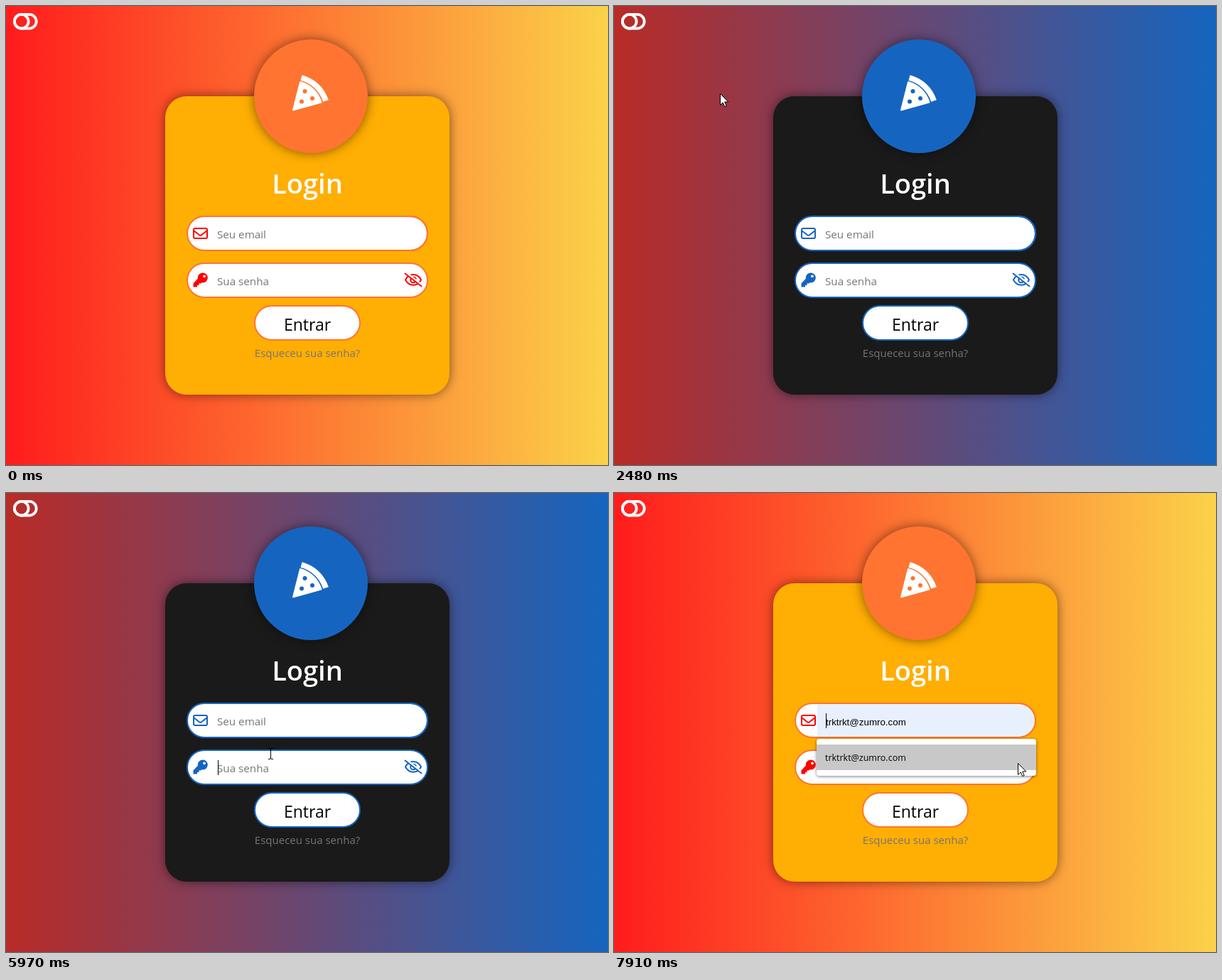
Animation, 847 px wide and 646 px high, one loop 7.99 s. Source, as an HTML page:

```html
<!DOCTYPE html>
<html lang="pt-BR">
<head>
<meta charset="utf-8">
<title>Login</title>
<style>
  html, body { margin: 0; width: 100%; height: 100%; overflow: hidden; }
  body {
    --accent: #ff7430; --icon: #f00; --card: #ffae03;
    background: linear-gradient(90deg, #ff1c1c, #fbd249);
  }
  body.dark {
    --accent: #1565c0; --icon: #1565c0; --card: #1a1a1a;
    background: linear-gradient(90deg, #b92b27, #1565c0);
  }
  .card, .badge, svg { position: absolute; }
  .card, .badge { box-shadow: 0 0 15px rgba(0, 0, 0, .5); }
  .card { left: 224px; top: 127px; width: 400px; height: 420px; border-radius: 30px; background: var(--card); }
  .badge { left: 349px; top: 47px; width: 160px; height: 160px; border-radius: 50%; background: var(--accent); }
  svg { left: 0; top: 0; }
  text { font-family: "Open Sans", "Noto Sans", sans-serif; }
  .mid { text-anchor: middle; }
  .hint { font-size: 15.2px; fill: #757575; }
  .box { fill: #fff; stroke: var(--accent); stroke-width: 2; }
  .edge { fill: none; stroke-width: 2; }
  .line { fill: none; stroke: var(--icon); stroke-width: 2; stroke-linejoin: round; stroke-linecap: round; }
  .toggle { fill: none; stroke: #fff; stroke-width: 3.8; }
  .caret { stroke: #000; }
  .pointer { fill: #fff; stroke: #000; stroke-linejoin: round; }
</style>
</head>
<body>
<div class="card"></div>
<div class="badge"></div>
<svg width="847" height="646" viewBox="0 0 847 646">
  <g class="toggle">
    <rect x="11.9" y="11.9" width="30.8" height="19.7" rx="9.85"/>
    <circle cx="21.75" cy="21.75" r="9.85"/>
  </g>

  <g fill="#fff">
    <path d="M404 146.5 414 107A42 42 0 0 1 443.5 135.5Z" stroke="#fff" stroke-width="2" stroke-linejoin="round"/>
    <path d="M415.5 101A49 49 0 0 1 450 133.5" fill="none" stroke="#fff" stroke-width="8"/>
    <g fill="var(--accent)">
      <circle cx="420.5" cy="120" r="3"/><circle cx="431" cy="130" r="3"/><circle cx="416" cy="134.5" r="3"/>
    </g>
  </g>

  <text class="mid" x="424" y="263.5" font-size="38" font-weight="600" fill="#fff">Login</text>

  <rect class="box" x="255" y="296" width="338" height="48" rx="24"/>
  <path id="filled" d="M286 297H570a23 23 0 0 1 0 46H286Z" fill="#e8f0fe"/>
  <path class="edge" d="M286 296H569a24 24 0 0 1 0 48H286"/>
  <g class="line">
    <rect x="264" y="313" width="19" height="14" rx="2"/>
    <path d="M264.5 316.5 272 322.3q1.5 1 3 0L282.5 316.5"/>
  </g>
  <text class="hint" id="emailHint" x="297" y="327">Seu email</text>
  <text id="emailText" x="298" y="327" style="font:13.33px 'Liberation Sans',Arial,sans-serif">trktrkt@zumro.com</text>
  <path class="caret" id="emailCaret" d="M298.5 310V331"/>

  <rect class="box" x="255" y="362" width="338" height="48" rx="24"/>
  <path class="edge" d="M286 362H562M286 410H562"/>
  <g fill="var(--icon)">
    <circle cx="276.8" cy="382.5" r="7"/>
    <path d="M270.5 383 263.5 390.5V395.5H269V393H271.5V390.5H274L278 387Z"/>
    <circle cx="279" cy="380.4" r="1.8" fill="#fff"/>
  </g>
  <g class="line" stroke-width="1.8">
    <path d="M562 385.5C567 375.5 579 375.5 584 385.5 579 395 567 395 562 385.5Z"/>
    <circle cx="573" cy="385.5" r="3.8"/>
    <path d="M562.5 375 586.5 394" style="stroke:#fff;stroke-width:3"/>
    <path d="M561.5 376.5 584.5 394.5"/>
  </g>
  <text class="hint" x="297" y="393">Sua senha</text>
  <path class="caret" id="passCaret" d="M298.5 376V397"/>

  <rect class="box" x="350" y="422" width="148" height="48" rx="24"/>
  <text class="mid" x="424" y="457" font-size="23">Entrar</text>
  <text class="mid hint" x="424" y="494" style="font-size:15px">Esqueceu sua senha?</text>

  <g id="menu">
    <rect x="285" y="346" width="309" height="52" rx="4" fill="#fff" style="filter:drop-shadow(0 1px 2px rgba(0,0,0,.5))"/>
    <rect id="row" x="285" y="354" width="309" height="36" fill="#c8c8c8"/>
    <text x="297" y="377" font-size="12.5">trktrkt@zumro.com</text>
  </g>

  <g id="cursor">
    <path class="pointer" id="arrow" d="M.5.5V16.5L4.2 13 6.8 18.6 9.2 17.5 6.7 12H11.8Z"/>
    <path class="pointer" id="hand" d="M-1.5 13V2a1.6 1.6 0 0 1 3.2 0V8a1.4 1.4 0 0 1 2.8.5 1.4 1.4 0 0 1 2.8.7 1.3 1.3 0 0 1 2.7.8V16L8 19.5V22.5H-.5V20.5L-5.5 14C-6.7 11.5-4-10.5-1.5 13Z"/>
    <path id="beam" d="M-3 -7.5H-1Q.5-7.5.5-6 .5-7.5 2-7.5H4M.5-6V6M-3 7.5H-1Q.5 7.5.5 6 .5 7.5 2 7.5H4" fill="none" stroke="#000"/>
  </g>
</svg>
<script>
const LOOP = 7990, TICK = 77.4, BLINK = 500, FADE = 150;
const DARK = [1220, 6661];
const EMAIL_FOCUS = [[4430, 5270], [7440, LOOP]];
const PASS_FOCUS = [[5880, 6661]];
const ORANGE = [255, 116, 48], BLUE = [21, 101, 192];

// time, x, y of the pointer tip
const PATH = [
  [60, 676, 527], [450, 330, 250], [840, 41, 40], [1000, 36, 28], [1220, 39, 36],
  [2250, 39, 36], [2560, 260, 210], [3024, 523, 450], [3100, 485, 460],
  [3333, 342, 346], [3800, 99, 138], [3980, 24, 63], [4430, 330, 322],
  [4720, 331, 344], [4882, 328, 364], [5270, 420, 275], [5580, 391, 313],
  [5660, 391, 325], [5733, 391, 378], [5888, 384, 377], [5965, 372, 367],
  [6660, 30, 18], [6900, 90, 70], [7440, 480, 315], [7590, 510, 278],
  [7670, 520, 300], [7750, 535, 335], [7825, 555, 365], [7900, 568, 380]
];

const byId = id => document.getElementById(id);
const show = (id, on) => byId(id).style.display = on ? "" : "none";
const within = (v, a, b) => v >= a && v < b;
const focusAge = (spans, t) => {
  const span = spans.find(([a, b]) => within(t, a, b));
  return span ? t - span[0] : -1;
};
const caretOn = age => age >= 0 && Math.floor(age / BLINK) % 2 === 0;

function pointerAt(t) {
  const i = PATH.findIndex(k => k[0] > t);
  if (i < 0) return PATH[PATH.length - 1].slice(1);
  if (i === 0) return PATH[0].slice(1);
  const [a, b] = [PATH[i - 1], PATH[i]];
  const p = (t - a[0]) / (b[0] - a[0]);
  return [1, 2].map(n => Math.round(a[n] + (b[n] - a[n]) * p));
}

function pointerKind(x, y, menuOpen) {
  if (menuOpen && within(x, 285, 594) && within(y, 346, 398)) return "arrow";
  if (within(x, 10, 45) && within(y, 10, 38)) return "hand";
  if (within(x, 349, 499) && within(y, 421, 471)) return "hand";
  if (within(x, 286, 594) && within(y, 295, 345)) return "beam";
  if (within(x, 286, 562) && within(y, 361, 411)) return "beam";
  return "arrow";
}

function edgeColor(t) {
  const ramp = start => Math.min(1, Math.max(0, (t - start) / FADE));
  const p = ramp(DARK[0]) - ramp(DARK[1]);
  return `rgb(${ORANGE.map((c, i) => Math.round(c + (BLUE[i] - c) * p))})`;
}

function render(time) {
  const base = time < 2250 ? 60 : 2250;
  const t = base + Math.floor((time - base) / TICK) * TICK;
  const [x, y] = pointerAt(t);
  const emailAge = focusAge(EMAIL_FOCUS, t);
  const menuOpen = emailAge > 70;
  const hover = menuOpen && within(x, 285, 594) && within(y, 354, 390);
  const kind = pointerKind(x, y, menuOpen);

  document.body.classList.toggle("dark", within(t, ...DARK));
  document.querySelectorAll(".edge").forEach(e => e.style.stroke = edgeColor(t));
  show("menu", menuOpen);
  show("row", hover);
  show("filled", hover);
  show("emailText", hover);
  show("emailHint", !hover);
  show("emailCaret", caretOn(emailAge));
  show("passCaret", caretOn(focusAge(PASS_FOCUS, t)));
  show("cursor", t >= 60);
  ["arrow", "hand", "beam"].forEach(k => show(k, k === kind));
  byId("cursor").setAttribute("transform", `translate(${x} ${y})`);
}

const start = performance.now();
function loop() {
  render((performance.now() - start) % LOOP);
  requestAnimationFrame(loop);
}
loop();
</script>
</body>
</html>
```
